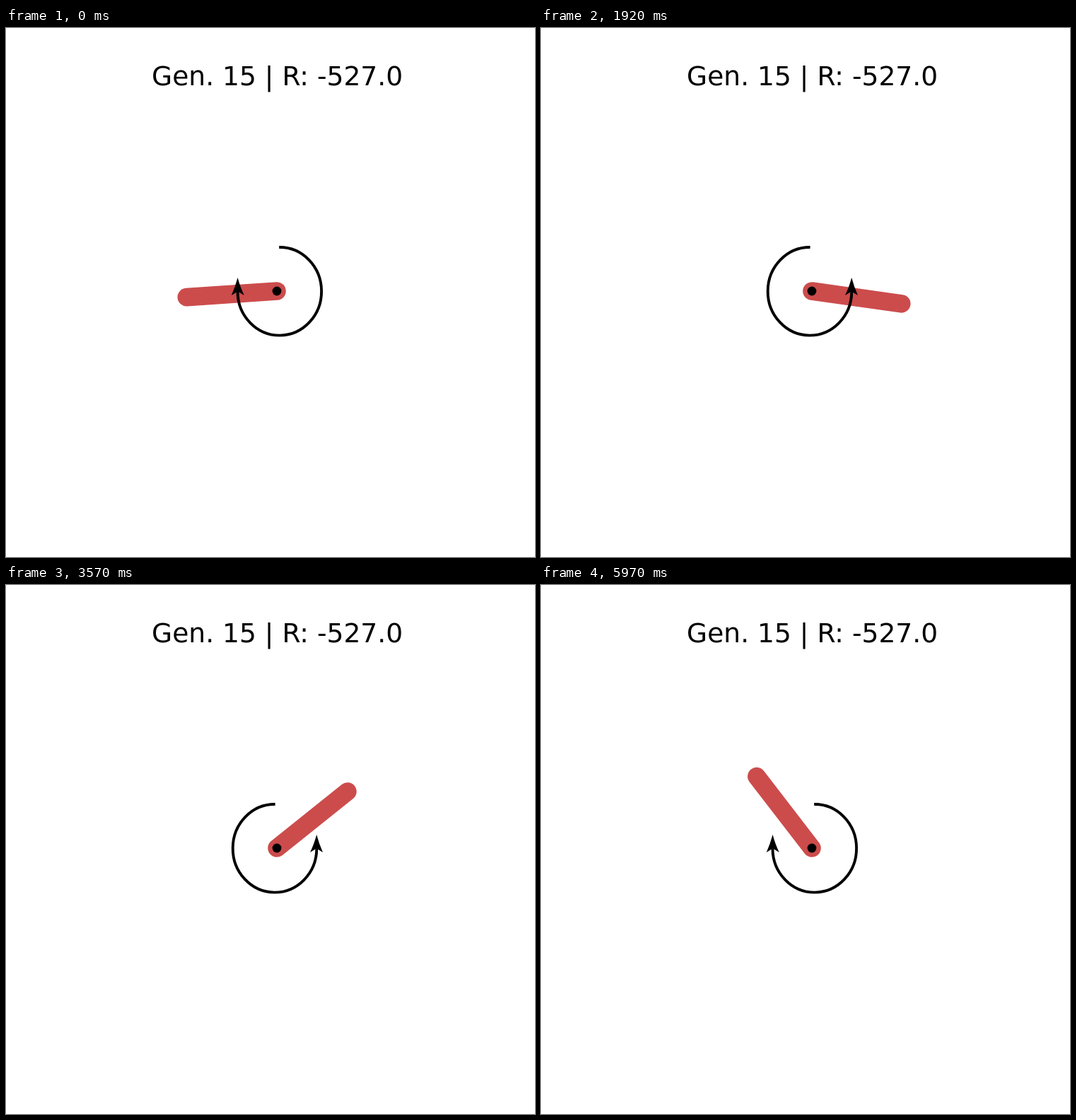
These frames come from a looping animation (748x748 px, 6000 ms). An HTML page with a canvas:

```html
<!DOCTYPE html>
<html lang="en">
<head>
<meta charset="utf-8">
<title>Pendulum</title>
<style>
html, body { margin: 0; width: 100%; height: 100%; overflow: hidden; background: #fff; }
canvas { display: block; width: 748px; height: 748px; }
</style>
</head>
<body>
<canvas id="stage" width="748" height="748"></canvas>
<script>
const ctx = document.getElementById('stage').getContext('2d');
const STEP = 30, STEPS = 200;
const PERIOD = 51.5; // steps per full turn
const CX = 383, CY = 372, ROD = 128, ROD_R = 12.8;

// Key poses of one turn: [phase, degrees counter-clockwise from upright].
// Slow creep over the top, then a fall to the left and a climb on the right.
const turn = [
  [-20.9, 0], [-15.2, 14], [-11.4, 19.4], [-5, 27], [0.3, 37.6], [2.35, 44.8],
  [7.5, 75], [10.4, 105], [13.6, 150], [19.8, 262], [23.8, 314.2], [28.2, 349.5]
];

// The turn repeats, so key i may lie outside the list.
function key(i) {
  const k = Math.floor(i / turn.length), [s, a] = turn[i - k * turn.length];
  return [s + k * PERIOD, a + k * 360];
}

function slope(i) {
  const [x0, y0] = key(i - 1), [x1, y1] = key(i), [x2, y2] = key(i + 1);
  const h0 = x1 - x0, h1 = x2 - x1;
  return ((y1 - y0) / h0 * h1 + (y2 - y1) / h1 * h0) / (h0 + h1);
}

function angleAt(n) {
  // The first fall starts slower and lags into the regular rhythm.
  const phase = n + 7.3 + 2.13 * Math.exp(-n / 3);
  let i = 0;
  while (key(i + 1)[0] <= phase) i++;
  const [x0, y0] = key(i), [x1, y1] = key(i + 1);
  const h = x1 - x0, u = (phase - x0) / h, v = 1 - u;
  return v * v * (1 + 2 * u) * y0 + u * u * (1 + 2 * v) * y1
    + h * u * v * (v * slope(i) - u * slope(i + 1));
}

// Torque drives the rod through the bottom, brakes it near the top,
// and gives one short kick before it falls again.
function drives(angle) {
  const a = angle % 360;
  return (a >= 145 && a < 332) || (a >= 20 && a < 21.6);
}

function drawRod(angle) {
  const r = angle * Math.PI / 180;
  ctx.strokeStyle = '#cc4c4c';
  ctx.lineWidth = ROD_R * 2;
  ctx.lineCap = 'round';
  ctx.beginPath();
  ctx.moveTo(CX, CY);
  ctx.lineTo(CX - ROD * Math.sin(r), CY - ROD * Math.cos(r));
  ctx.stroke();
  ctx.fillStyle = '#000';
  ctx.beginPath();
  ctx.arc(CX, CY, 6.4, 0, Math.PI * 2);
  ctx.fill();
}

function drawTorque(flip) {
  ctx.save();
  ctx.translate(383.4, CY);
  if (flip) ctx.scale(-1, 1);
  ctx.strokeStyle = ctx.fillStyle = '#000';
  ctx.lineWidth = 3.9;
  ctx.lineCap = 'butt';
  ctx.beginPath();
  ctx.ellipse(3.4, 0.3, 59.3, 62.3, 0, -Math.PI / 2 - 0.01, Math.PI);
  ctx.stroke();
  ctx.beginPath();
  ctx.moveTo(-55.8, -19);
  ctx.quadraticCurveTo(-52, -5, -46.6, 6);
  ctx.lineTo(-55.6, 0.5);
  ctx.lineTo(-64.6, 6);
  ctx.quadraticCurveTo(-59.6, -5, -55.8, -19);
  ctx.fill();
  ctx.restore();
}

function drawTitle() {
  ctx.fillStyle = '#000';
  ctx.font = '37.6px "DejaVu Sans", sans-serif';
  ctx.textAlign = 'right';
  ctx.textBaseline = 'alphabetic';
  ctx.fillText('Gen. 15 | R: -527.0', 561.1, 81);
}

function draw(n) {
  const angle = angleAt(n);
  ctx.fillStyle = '#fff';
  ctx.fillRect(0, 0, 748, 748);
  drawTitle();
  drawRod(angle);
  drawTorque(drives(angle));
}

const begin = performance.now();
function tick() {
  draw(Math.floor((performance.now() - begin) / STEP) % STEPS);
  requestAnimationFrame(tick);
}
tick();
</script>
</body>
</html>
```
